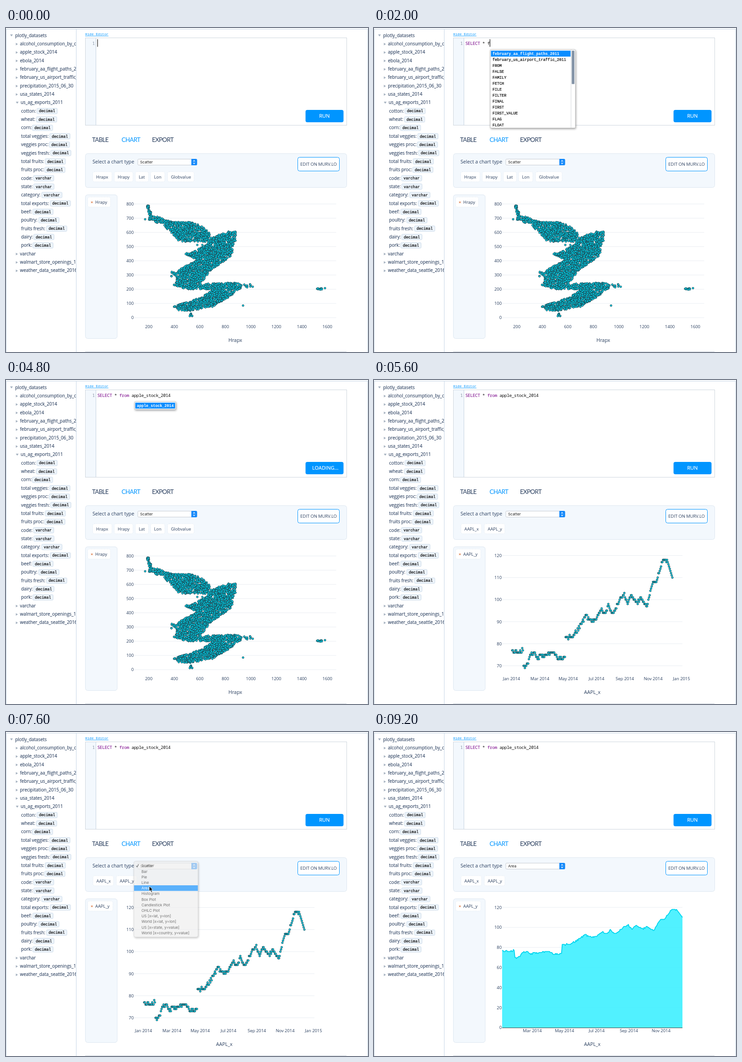
An HTML page that plays this animation: 791x708 px, repeating every 9.6 s.

```html
<!DOCTYPE html>
<html lang="en">
<head>
<meta charset="utf-8">
<title>SQL editor and chart builder</title>
<style>
html, body { margin: 0; width: 100%; height: 100%; overflow: hidden; background: #fff; }
svg { display: block; width: 791px; height: 708px; }
text { font-family: "Open Sans", "Noto Sans", sans-serif; font-size: 9.4px; fill: #2a3f5f; white-space: pre; }
.side { font-size: 9.9px; stroke: #2a3f5f; stroke-width: .12px; }
.mono { font-family: "Liberation Mono", monospace; font-size: 8.38px; fill: #000; stroke: #000; stroke-width: .2px; }
.pick { font-weight: bold; fill: #fff; stroke: none; }
.code { font-family: "Noto Sans Mono", monospace; font-size: 9.6px; letter-spacing: -.427px; fill: #111; }
.key { fill: #770088; }
.sys { font-family: Inter, sans-serif; font-size: 8.2px; fill: #222; }
.tab { font-family: Lato, sans-serif; font-size: 13.4px; letter-spacing: -.7px; }
.big { font-size: 10.7px; }
.run { font-size: 11.1px; fill: #fff; stroke: #fff; stroke-width: .2px; }
.mid { text-anchor: middle; }
.end { text-anchor: end; }
.shadow { filter: drop-shadow(1px 2px 2px rgba(0, 0, 0, .35)); }
</style>
</head>
<body>
<svg id="stage" viewBox="0 0 791 708" xmlns="http://www.w3.org/2000/svg"></svg>
<script>
const STEP = 400, LOOP = 9600;
const BLUE = '#0095ff', PALE = '#f3f8fd', EDGE = '#dde7f1';

const text = (x, y, s, cls = '', more = '') => `<text x="${x}" y="${y}" class="${cls}" ${more}>${s}</text>`;
const rect = (x, y, w, h, fill, more = '') => `<rect x="${x}" y="${y}" width="${w}" height="${h}" fill="${fill}" ${more}/>`;
const line = (x1, y1, x2, y2, color) => `<path d="M${x1} ${y1}L${x2} ${y2}" stroke="${color}"/>`;
const poly = (d, fill, more = '') => `<path d="${d}" fill="${fill}" ${more}/>`;
const group = (id, body = '') => `<g id="${id}">${body}</g>`;
const range = n => [...Array(n).keys()];

function seeded(seed) {
  return () => {
    seed = (seed + 0x6D2B79F5) | 0;
    let t = Math.imul(seed ^ (seed >>> 15), 1 | seed);
    t = (t + Math.imul(t ^ (t >>> 7), 61 | t)) ^ t;
    return ((t ^ (t >>> 14)) >>> 0) / 4294967296;
  };
}

// Sidebar
const tables = ['alcohol_consumption_by_country', 'apple_stock_2014', 'ebola_2014', 'february_aa_flight_paths_2011',
  'february_us_airport_traffic_2011', 'precipitation_2015_06_30', 'usa_states_2014'];
const columns = [['cotton', 67], ['wheat', 66], ['corn', 57], ['total veggies', 95], ['veggies proc', 94],
  ['veggies fresh', 97], ['total fruits', 85], ['fruits proc', 84], ['code', 59.5], ['state', 60], ['category', 77.5],
  ['total exports', 96], ['beef', 58], ['poultry', 71], ['fruits fresh', 88], ['dairy', 60], ['pork', 58]];
const textual = ['code', 'state', 'category'];
const moreTables = ['varchar', 'walmart_store_openings_1962', 'weather_data_seattle_2016'];
const rowY = i => 16.3 + 18.35 * i;

function sidebar() {
  const open = (x, y) => poly(`M${x} ${y - 2}h6l-3 4.5z`, '#a5b1bf');
  const closed = (s, i) => poly(`M21.5 ${rowY(i) - 2.3}v5.6l4.5 -2.8z`, '#a5b1bf') + text(30.5, rowY(i) + 3.3, s, 'side');
  const column = ([name, x], i) => {
    const y = rowY(i + 9);
    return text(33, y + 3.3, name + ':', 'side') +
      rect(x + .5, y - 6, 44.5, 12, '#edf4fb', 'rx="2" stroke="#ccdbe9"') +
      text(x + 5, y + 3, textual.includes(name) ? 'varchar' : 'decimal', 'mono');
  };
  return `<clipPath id="sideClip"><path d="M0 0h153v708H0z"/></clipPath><g clip-path="url(#sideClip)">` +
    open(9, 16) + text(20, 19.6, 'plotly_datasets', 'side') +
    tables.map((s, i) => closed(s, i + 1)).join('') +
    open(21.5, rowY(8)) + text(32, rowY(8) + 3.3, 'us_ag_exports_2011', 'side') +
    columns.map(column).join('') +
    moreTables.map((s, i) => closed(s, i + 26)).join('') + '</g>';
}

function frame() {
  return rect(0, 0, 791, 708, '#fff') +
    poly('M.5 708V2.5H790.5V708M153.5 2.5V708', 'none', 'stroke="#c6d6e6"') +
    line(173, 707.5, 744, 707.5, '#ccd3dc') +
    text(173, 16, 'Hide Editor', 'mono', `style="font-size:7.73px;fill:${BLUE};stroke:none;text-decoration:underline"`) +
    rect(173.5, 21.5, 571, 191, '#fff', 'stroke="#cfd6de"') +
    rect(174, 22, 22, 190, PALE) + line(196.5, 22, 196.5, 212, '#c5d3e1') +
    text(188.5, 37, '1', 'code', 'style="fill:#8b98a8"') +
    rect(654.5, 179, 83, 27, BLUE, 'rx="4"') +
    text(188, 248.5, 'TABLE', 'tab') + text(252.5, 248.5, 'CHART', 'tab', `style="fill:${BLUE}"`) +
    text(319, 248.5, 'EXPORT', 'tab') +
    rect(173.5, 274.5, 571, 74, PALE, `rx="5" stroke="${EDGE}"`) +
    rect(173.5, 364.5, 69.5, 314, PALE, `rx="5" stroke="${EDGE}"`) +
    text(189, 296.3, 'Select a chart type', 'big') +
    rect(288, 286.5, 129, 13, '#fff', 'rx="2" stroke="#c3c8ce" stroke-width=".9"') +
    poly('M405 286h10q2.5 0 2.5 2.5v9q0 2.5 -2.5 2.5h-10z', '#1489fa') +
    poly('M409 291.8l2 -2.4l2 2.4M409 294.4l2 2.4l2 -2.4', 'none', 'stroke="#fff" stroke-width="1.1"') +
    rect(637.5, 282.5, 91, 30, '#fff', `rx="4" stroke="${BLUE}"`) +
    text(683, 301.2, 'EDIT ON MURV.LO', 'mid');
}

const tag = (x, y, w, s, pad = 8) =>
  rect(x + .5, y, w, 22, '#fff', 'rx="4" stroke="#dce6f0" stroke-dasharray="2 1.5" stroke-width=".8"') +
  text(x + pad, y + 14.5, s);

const fields = (tags, side, sideW) => tags.map(([s, x, w]) => tag(x, 314, w, s)).join('') +
  tag(178, 369.3, sideW, side, 17) + text(185, 384, '×', '', 'style="fill:#d9743c;font-weight:bold"');

// Charts
const gridRow = (label, y, right) => line(280, y, right, y, '#e9edf2') + text(279, y + 3.4, label, 'end');
const dots = pts => '<g fill="#00cfe6" stroke="#1d4752" stroke-width=".9">' +
  pts.map(([x, y]) => `<circle cx="${x.toFixed(1)}" cy="${y.toFixed(1)}" r="2.1"/>`).join('') + '</g>';

// Each band is filled at random between its rows of [y, left, right].
const bands = [
  [[388, 309, 311], [414, 314, 319]],
  [[411, 313, 330], [419, 309, 346], [426, 333, 374]],
  [[424, 350, 405], [433, 346, 427], [450, 366, 446], [467, 379, 443]],
  [[445, 484, 502], [458, 450, 502], [475, 437, 496], [495, 397, 494], [507, 419, 479], [530, 376, 446], [558, 370, 424]],
  [[557, 486, 509], [561, 366, 515], [571, 397, 512]],
  [[572, 450, 506], [588, 430, 487], [608, 367, 450], [618, 380, 406]]
];

function fillBand(rows, rnd) {
  const top = rows[0][0], bottom = rows[rows.length - 1][0];
  const min = Math.min(...rows.map(r => r[1])), max = Math.max(...rows.map(r => r[2]));
  const pts = [], tries = (bottom - top) * (max - min) * .21;
  for (let n = 0; n < tries; n++) {
    const y = top + rnd() * (bottom - top), x = min + rnd() * (max - min), slack = rnd() * 3 - 1;
    const i = rows.findIndex((r, k) => k && y <= r[0]), [a, b] = [rows[i - 1], rows[i]];
    const k = (y - a[0]) / (b[0] - a[0]);
    const left = a[1] + k * (b[1] - a[1]), right = a[2] + k * (b[2] - a[2]);
    if (x > left - slack && x < right + slack) pts.push([x, y]);
  }
  return pts;
}

function cloud() {
  const rnd = seeded(7);
  const speck = (n, x, y, w, h) => range(n).map(() => [x + w * rnd(), y + h * rnd()]);
  return [[304, 418], [518, 606.5], [697, 568.5], [418, 474], [429, 474]].concat(
    ...bands.map(b => fillBand(b, rnd)), speck(40, 309, 388, 3, 6), speck(12, 520, 560, 20, 7),
    speck(10, 679, 569, 14, 4), speck(8, 400, 624, 7, 6), speck(18, 388, 492, 22, 4),
    speck(12, 361, 530, 13, 13), speck(8, 436, 605, 22, 5));
}

function cloudChart() {
  return range(9).map(i => gridRow(i * 100, 633 - 31.06 * i, 721.5)).join('') +
    range(8).map(i => text(312 + 55.75 * i, 656.2, 200 + 200 * i, 'mid')).join('') +
    text(501, 686, 'Hrapx', 'big mid') + dots(cloud());
}

// Prices at even intervals; the days between follow with a little noise.
const levels = [77, 76, 76, 77, 69.5, 72, 75.5, 76, 73, 75, 75, 75, 76.5, 76, 74, 73, 74, 83, 83, 83, 85.5, 88, 90, 93,
  91, 90, 91, 94, 95.5, 94, 97, 94, 95, 98, 101, 102, 98, 101.5, 100, 98.5, 100.5, 99, 96, 103, 108, 108.5, 113, 117.5,
  118, 115.5, 110];

function prices() {
  const rnd = seeded(21), days = 240;
  return range(days + 1).map(n => {
    const at = n / days * (levels.length - 1), i = Math.min(Math.floor(at), levels.length - 2);
    const a = levels[i], b = levels[i + 1], k = at - i;
    const mix = Math.abs(b - a) > 7 ? Math.round(k) : k;
    return [n / days, Math.round(a + (b - a) * mix + rnd() * 1.4 - .7)];
  });
}
const series = prices();
const months = ['Jan 2014', 'Mar 2014', 'May 2014', 'Jul 2014', 'Sep 2014', 'Nov 2014', 'Jan 2015'];
const stockTitle = text(477, 686, 'AAPL_x', 'big mid');

function stockChart() {
  return range(6).map(i => gridRow(70 + 10 * i, 624.5 - 48.2 * i, 674)).join('') +
    months.map((m, i) => text(300.5 + 61.9 * i, 656.2, m, 'mid')).join('') + stockTitle +
    dots(series.map(([t, v]) => [302 + 350 * t, 624.5 - (v - 70) * 4.82]));
}

function areaChart() {
  const d = 'M' + series.map(([t, v]) => `${(280 + 394 * t).toFixed(1)} ${(646 - v * 2.19).toFixed(1)}`).join('L');
  return range(7).map(i => gridRow(20 * i, 646 - 43.8 * i, 674)).join('') +
    poly(d + 'V646H280Z', '#3ff0ff', 'fill-opacity=".9"') +
    poly(d, 'none', 'stroke="#00d5ee" stroke-width="1.8" stroke-linejoin="round"') +
    line(280, 646.5, 674, 646.5, '#444') +
    months.slice(1, 6).map((m, i) => text(346 + 70.3 * i, 656.2, m, 'mid')).join('') + stockTitle;
}

// Moving parts
const keyword = /^(SELECT|from)$/;
function query(s, caret) {
  const body = s.split(' ').map(w => keyword.test(w) ? `<tspan class="key">${w}</tspan>` : w).join(' ');
  return text(199.5, 36.8, body, 'code') + (caret ? rect(199.5 + s.length * 5.333, 24.5, 1.2, 16.5, '#111') : '');
}

function hints({ x, w, thumb, items }) {
  const h = thumb ? 171.5 : 17.5, bar = w - (thumb ? 12 : 3);
  return rect(x, 47, w, h, '#fff', 'rx="2" stroke="#b5b5b5" stroke-width=".8" class="shadow"') +
    rect(x + 1.5, 49.5, bar, 13, '#0a8cff') +
    items.map((s, i) => text(x + 5, 59 + 13 * i, s, i ? 'mono' : 'mono pick')).join('') +
    (thumb ? line(x + w - 9.5, 48, x + w - 9.5, 218, '#d5d8dc') + rect(x + w - 8, 49.5, 6, thumb, '#8595a8', 'rx="1"') : '');
}

const choices = ['Scatter', 'Bar', 'Pie', 'Line', 'Area', 'Histogram', 'Box Plot', 'Candlestick Plot', 'OHLC Plot',
  'US [x=lat, y=lon]', 'World [x=lat, y=lon]', 'US [x=state, y=value]', 'World [x=country, y=value]'];

function dropdown(on, fade) {
  const y = i => 292.4 + 12.2 * i, ink = i => `style="fill:${i === on ? '#fff' : '#222'}"`;
  return `<g opacity="${fade ? .65 : 1}">` +
    rect(279.5, 282.5, 140, 165.5, '#eee', 'rx="4" stroke="#c4c4c4" stroke-width=".7" class="shadow"') +
    rect(279.8, y(on) - 6.2, 139.4, 12.2, '#0a8cfa') +
    poly(`M284.5 ${y(0)}l2 2.6l3.4 -6`, 'none', `stroke="${on ? '#222' : '#fff'}" stroke-width="1.2"`) +
    choices.map((s, i) => text(296, y(i) + 3, s, 'sys', ink(i))).join('') + '</g>';
}

const pointer = (x, y) => poly(`M${x} ${y}v11l2.6 -2.3l1.9 4.3l2 -.9l-1.9 -4.2h3.5z`, '#000', 'stroke="#fff" stroke-width=".8"');

const sHints = { x: 211, w: 86, thumb: 54, items: ['SELECT', 'SET', 'SECOND', 'SECTION', 'SECURITY', 'SELF', 'SENSITIVE',
  'SEQUENCE', 'SERVER', 'SESSION', 'SETOF', 'SETS', 'SEARCH'] };
const fHints = { x: 254, w: 186, thumb: 73, items: ['february_aa_flight_paths_2011', 'february_us_airport_traffic_2011',
  'FROM', 'FALSE', 'FAMILY', 'FETCH', 'FILE', 'FILTER', 'FINAL', 'FIRST', 'FIRST_VALUE', 'FLAG', 'FLOAT'] };
const aHints = { x: 281, w: 130, thumb: 53, items: ['apple_stock_2014', 'ALTER', 'AND', 'AS', 'ASC', 'A', 'ABORT', 'ABS',
  'ABSENT', 'ABSOLUTE', 'ACCESS', 'ACCORDING', 'ACTION'] };
const oneHint = { x: 281, w: 90, items: ['apple_stock_2014'] };

// Each entry changes the state from its step on.
const script = {
  0: { query: '', caret: true, hints: null, loading: false, chart: 0, menu: -1, fade: false, mouse: 0 },
  2: { query: 'SE', hints: sHints },
  3: { query: 'SELECT', hints: null },
  4: { query: 'SELECT *' },
  5: { query: 'SELECT * f', hints: fHints },
  6: { query: 'SELECT * from', hints: null },
  7: { query: 'SELECT * from a', hints: aHints },
  8: { query: 'SELECT * from apple', hints: oneHint },
  9: { query: 'SELECT * from apple_stock_2014' },
  10: { loading: true, caret: false },
  13: { loading: false, hints: null, chart: 1 },
  15: { mouse: 286 },
  16: { menu: 0 },
  17: { menu: 2, mouse: 312 },
  18: { menu: 4, mouse: 337 },
  19: { fade: true },
  20: { menu: -1, fade: false, mouse: 0, chart: 2 }
};
const states = [];
for (const i of range(LOOP / STEP)) states.push({ ...states[i - 1], ...script[i] });

const hrapTags = [['Hrapx', 189, 42], ['Hrapy', 236, 41], ['Lat', 282, 29], ['Lon', 315.5, 31], ['Globvalue', 352.5, 58]];
const stockTags = [['AAPL_x', 189.5, 45], ['AAPL_y', 240.5, 45]];
document.getElementById('stage').innerHTML = frame() + sidebar() +
  group('chart0', fields(hrapTags, 'Hrapy', 50) + cloudChart()) +
  group('chart1', fields(stockTags, 'AAPL_y', 55) + stockChart()) +
  group('chart2', fields(stockTags, 'AAPL_y', 55) + areaChart()) +
  group('live');
const charts = range(3).map(i => document.getElementById('chart' + i));
const live = document.getElementById('live');

function render(s) {
  charts.forEach((c, i) => { c.style.display = i === s.chart ? '' : 'none'; });
  live.innerHTML = query(s.query, s.caret) +
    (s.loading ? text(669, 196, 'LOADING...', 'run') : text(695.8, 196, 'RUN', 'run mid')) +
    text(293, 296, s.chart === 2 ? 'Area' : 'Scatter', 'sys') +
    (s.hints ? hints(s.hints) : '') +
    (s.menu >= 0 ? dropdown(s.menu, s.fade) : '') +
    (s.mouse ? pointer(313, s.mouse) : '');
}

let shown = -1;
function tick() {
  const step = Math.floor(performance.now() % LOOP / STEP);
  if (step !== shown) render(states[shown = step]);
  requestAnimationFrame(tick);
}
tick();
</script>
</body>
</html>
```
